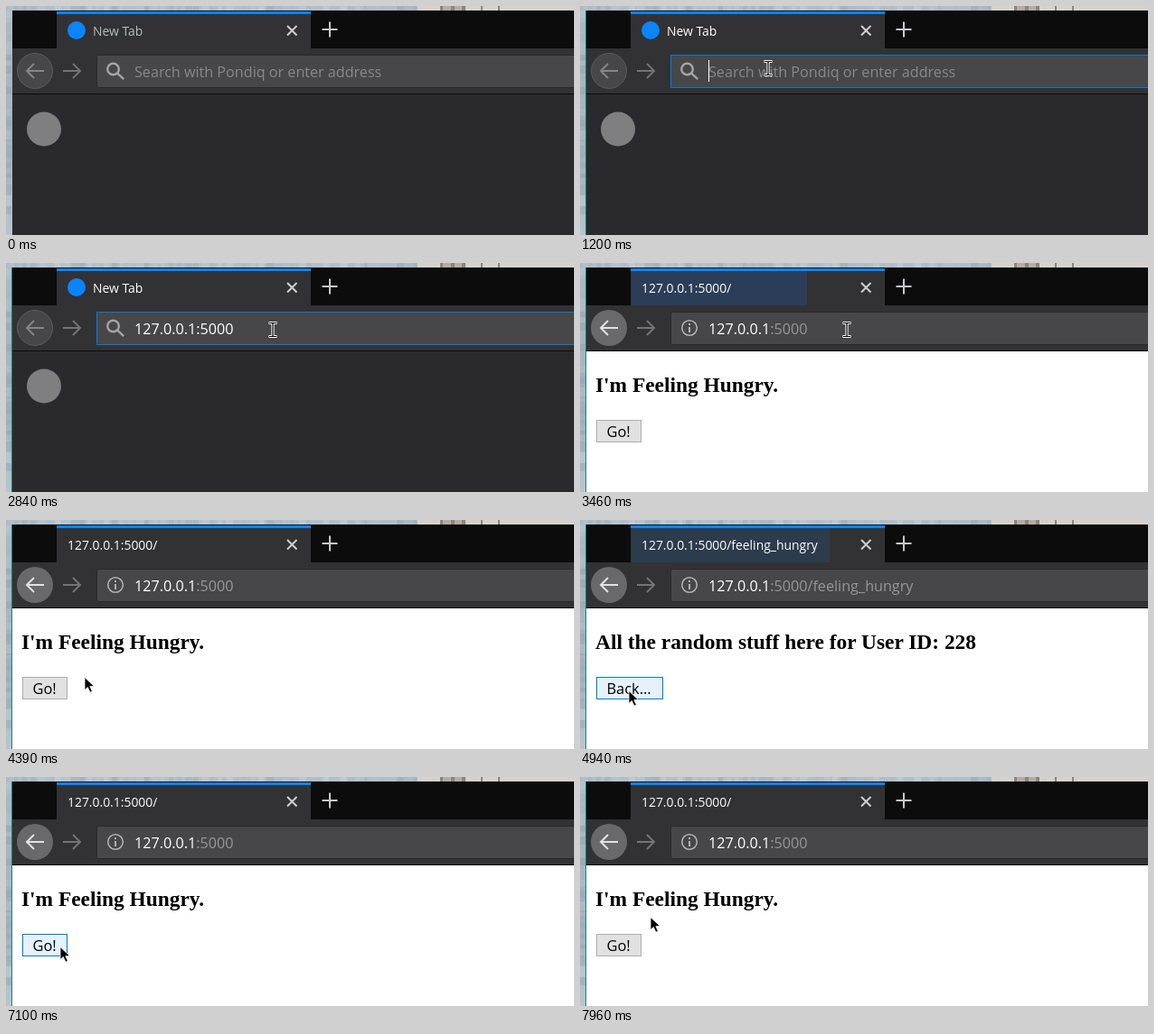
An HTML page for the animation above (8 s loop, 628 by 254 pixels).

```html
<!DOCTYPE html>
<html lang="en">
<head>
<meta charset="utf-8">
<title>Browser demo</title>
<style>
  html, body { margin: 0; width: 100%; height: 100%; overflow: hidden; background: #323234; }
  svg { display: block; width: 628px; height: 254px; }
  text { font-family: "Open Sans", "Noto Sans", sans-serif; font-size: 16.15px; fill: #fff; }
  .tab { font-size: 13.9px; }
  .dim { fill: #97979a; }
  .head { font: bold 23.4px "Liberation Serif", serif; fill: #000; }
  .line { fill: none; stroke: #b1b1b3; stroke-width: 2; }
  .btn text { font-size: 16.4px; fill: #000; }
  .btn rect { fill: #e1e1e1; stroke: #adadad; }
  .btn.hover rect { fill: #e5f1fb; stroke: #0078d7; }
  .btn.press rect { fill: #cce4f7; stroke: #005499; }
</style>
</head>
<body>
<svg viewBox="0 0 628 254">
  <defs>
    <linearGradient id="wall" x2="0" y2="1">
      <stop offset="0" stop-color="#b3c0c9"/>
      <stop offset=".6" stop-color="#9fafbb"/>
      <stop offset="1" stop-color="#b9c5ce"/>
    </linearGradient>
    <linearGradient id="shade" x2="0" y2="1">
      <stop offset="0" stop-opacity=".5"/>
      <stop offset="1" stop-opacity="0"/>
    </linearGradient>
  </defs>

  <!-- desktop -->
  <rect width="628" height="254" fill="url(#wall)"/>
  <g id="grain"></g>
  <rect x="455" width="173" height="6" fill="#d6d2cb"/>
  <path d="M480 0h28v6h-28zM525 0h2v6h-2zM544 0h2v6h-2z" fill="#8c857e"/>
  <path d="M483 0h9v6h-9zM496 0h8v6h-8z" fill="#b5aca3"/>

  <!-- window chrome -->
  <rect x="7" y="5" width="621" height="42" fill="#0c0c0d"/>
  <rect x="56" y="6" width="281" height="41" fill="#323234"/>
  <rect id="tint" x="57" y="9" width="0" height="38"/>
  <rect x="56" y="6" width="281" height="3" fill="#0a84ff"/>
  <rect x="7" y="47" width="621" height="50" fill="#323234"/>
  <rect x="6" y="5" width="1" height="249" fill="#1c7f74" data-on="1200-8000"/>
  <path class="line" d="M311 22l10.500 10.500M321.500 22l-10.500 10.500" style="stroke:#d0d0d3"/>
  <path class="line" d="M349.500 26h17M358 17.500v17" style="stroke:#c8c8ca"/>

  <circle cx="78" cy="27" r="10" fill="#0a84ff" data-on="0-3230"/>
  <text class="tab" x="96" y="32.500" style="fill:#b8bcc2" data-on="0-1200">New Tab</text>
  <text class="tab" x="96" y="32.500" data-on="1200-3230">New Tab</text>
  <text class="tab" x="68" y="32.500" data-on="3230-4710,7030-8000">127.0.0.1:5000/</text>
  <text class="tab" x="68" y="32.500" data-on="4710-7030">127.0.0.1:5000/feeling_hungry</text>

  <g data-on="0-3310">
    <circle cx="32" cy="72" r="19.500" fill="#474749" stroke="#5b5b5d"/>
    <path class="line" d="M42 72H23M31 64l-8 8 8 8" style="stroke:#858587"/>
  </g>
  <g data-on="3310-8000">
    <circle cx="32" cy="72" r="20" fill="#69696b"/>
    <path class="line" d="M42 72H23M31 64l-8 8 8 8" style="stroke:#e2e2e4"/>
  </g>
  <path class="line" d="M63 72h19M74 64l8 8-8 8" style="stroke:#747476"/>

  <!-- address bar -->
  <path d="M640 54.500H102.500q-2 0-2 2v32q0 2 2 2H640z" fill="#474749" stroke="#29292b"/>
  <path d="M640 54.500H100.500v36H640" fill="none" stroke="#0a78d8" stroke-width="1.200" data-on="1200-3230"/>
  <g class="line" data-on="0-3230" style="stroke:#a5a5a7;stroke-width:2.400">
    <circle cx="118.500" cy="70" r="6.300"/>
    <path d="M123.200 74.700l7 6.500"/>
  </g>
  <g data-on="3230-8000">
    <circle class="line" cx="121" cy="72" r="8.300" style="stroke-width:1.600"/>
    <path d="M120 71h2v6h-2zM120 67h2v2h-2z" fill="#b1b1b3"/>
  </g>
  <text x="142" y="78.800" style="fill:#88888a" data-on="0-1980">Search with Pondiq or enter address</text>
  <text x="142" y="78.800" data-on="1980-3230">127.0.0.1:5000</text>
  <text x="142" y="78.800" data-on="3230-4710,7030-8000">127.0.0.1<tspan class="dim">:5000</tspan></text>
  <text x="142" y="78.800" data-on="4710-7030">127.0.0.1<tspan class="dim">:5000/feeling_hungry</tspan></text>
  <rect x="142" y="60" width="1" height="24" fill="#fff" data-on="1200-1750"/>
  <rect x="250" y="60" width="1" height="24" fill="#fff" data-on="1980-2840"/>

  <!-- new tab page -->
  <g data-on="0-3310">
    <rect x="7" y="97" width="621" height="157" fill="#2a2a2e"/>
    <circle cx="42" cy="136.500" r="19" fill="#7f7f81"/>
  </g>

  <!-- suggestions -->
  <g data-on="1980-2670">
    <rect x="7" y="221" width="621" height="4" fill="url(#shade)"/>
    <rect x="8" y="98" width="620" height="48" fill="#4a4a4d"/>
    <rect x="8" y="146" width="620" height="75" fill="#727273"/>
    <path d="M8 146.500h620M8 180.500h620M68.500 187v28" stroke="#858586"/>
    <g class="line" style="stroke-width:1.500">
      <circle cx="122" cy="122" r="9"/>
      <ellipse cx="122" cy="122" rx="4.200" ry="9"/>
      <path d="M113 122h18M114.500 117.500h15M114.500 126.500h15"/>
    </g>
    <text x="143" y="128.500" style="font-size:16.300px">http://<tspan font-weight="600">127.0.0.1:5000</tspan>/</text>
    <path d="M315 124.500h15" stroke="#88888b"/>
    <text x="336" y="129" style="font-size:15px;fill:#347d22">Visit</text>
    <text x="16" y="170" style="font-size:14px;fill:#bcbcbd">Search with:</text>
    <circle cx="39" cy="201" r="10" fill="#fff"/>
    <circle cx="99" cy="201" r="10" fill="#de5833"/>
  </g>

  <!-- site -->
  <g data-on="3310-8000">
    <rect x="7" y="97" width="621" height="157" fill="#fff"/>
    <g data-on="3380-4790,7030-8000">
      <text class="head" x="17" y="143.300">I'm Feeling Hungry.</text>
      <g class="btn" data-press="4640">
        <rect x="18.500" y="174.500" width="49" height="24"/>
        <text x="29.500" y="192.800">Go!</text>
      </g>
    </g>
    <g data-on="4790-7030">
      <text class="head" x="17" y="143.300">All the random stuff here for User ID: 228</text>
      <g class="btn" data-press="6870">
        <rect x="18.500" y="174.500" width="73" height="24"/>
        <text x="29.500" y="192.800">Back...</text>
      </g>
    </g>
  </g>
  <path d="M7 97.500h621" stroke="#0c0c0d"/>

  <!-- pointer -->
  <g id="pointer" data-on="670-8000">
    <path id="arrow" d="M0-.5v14l3.300-3 2.600 5.700 2.500-1.100-2.600-5.500h4.700z" fill="#000" stroke="#fff" stroke-width=".8"/>
    <g id="beam" fill="none">
      <path d="M-4.500-7.500h3.500q1 0 1 1v13q0 1-1 1h-3.500M4.500-7.500H1q-1 0-1 1v13q0 1 1 1h3.500" stroke="#fff" stroke-width="3.200"/>
      <path d="M-4-7.500h3q1 0 1 1v13q0 1-1 1h-3M4-7.500H1q-1 0-1 1v13q0 1 1 1h3" stroke="#000" stroke-width="1.200"/>
    </g>
  </g>
</svg>

<script>
const LOOP = 8000;
const $ = id => document.getElementById(id);

// pointer refresh bursts: start, end, steps
const bursts = [
  [670, 1200, 8], [1980, 2520, 8], [4010, 4480, 7],
  [5350, 6100, 11], [6180, 6720, 8], [7340, 7960, 9]
];

// pointer path: time, x, y
const path = [
  [590, 350, -16], [900, 246, 48], [1200, 208, 69],
  [2058, 208, 69], [2520, 295, 74],
  [3932, 295, 74], [4250, 150, 145], [4480, 54, 190],
  [5275, 54, 190], [5575, 250, 165], [5800, 434, 123], [6100, 423, 141],
  [6103, 423, 141], [6257, 230, 172], [6411, 89, 193], [6566, 70, 198], [6720, 60, 189],
  [7262, 60, 189], [7650, 86, 166], [7960, 78, 156]
];

// tab loading glow: time, width, colour
const glow = [
  [0, 0], [3380, 100, '#2a4263'], [3460, 194, '#2c3e57'], [3540, 0],
  [4790, 100, '#2a4263'], [4860, 194, '#2c3e57'], [4940, 219, '#2d3c4c'], [5110, 0],
  [7110, 194, '#2c3e57'], [7180, 219, '#2d3c4c'], [7340, 0]
];

const timed = [...document.querySelectorAll('[data-on]')].map(el => ({
  el, spans: el.dataset.on.split(',').map(s => s.split('-').map(Number))
}));
const buttons = [...document.querySelectorAll('.btn')].map(el => ({
  el, press: +el.dataset.press, right: 19 + +el.querySelector('rect').getAttribute('width')
}));

function snap(t) {
  let s = 0;
  for (const [a, b, n] of bursts) {
    if (t < a) break;
    const d = (b - a) / (n - 1);
    s = a + Math.min(n - 1, Math.floor((t - a + 12) / d)) * d;
  }
  return s;
}

function pointerAt(t) {
  const i = path.findIndex(p => p[0] > t);
  if (i < 0) return path[path.length - 1].slice(1);
  if (i === 0) return path[0].slice(1);
  const [a, b] = [path[i - 1], path[i]];
  const k = (t - a[0]) / (b[0] - a[0]);
  return [1, 2].map(j => Math.round(a[j] + (b[j] - a[j]) * k));
}

function draw(t) {
  for (const { el, spans } of timed)
    el.style.display = spans.some(([a, b]) => t >= a && t < b) ? '' : 'none';

  const [x, y] = pointerAt(snap(t));
  const overBar = x > 100 && y > 54 && y < 92;
  const overHead = t > 4790 && t < 7030 && x < 440 && y > 120 && y < 150;
  const text = overBar || overHead;
  $('pointer').setAttribute('transform', `translate(${x} ${y})`);
  $('arrow').style.display = text ? 'none' : '';
  $('beam').style.display = text ? '' : 'none';

  for (const { el, press, right } of buttons) {
    const over = x >= 18 && x < right && y >= 174 && y < 199;
    el.classList.toggle('hover', over);
    el.classList.toggle('press', over && t >= press && t < press + 160);
  }

  const [, width, colour] = glow.filter(g => g[0] <= t).pop();
  $('tint').setAttribute('width', width);
  $('tint').setAttribute('fill', colour || 'none');
}

// uneven wallpaper strips along the top and left edges
let seed = 7;
const rand = () => (seed = seed * 16807 % 2147483647) / 2147483647;
let grain = '';
const strip = (x, y, w, h) => {
  const tone = rand() < .5 ? '#fff' : '#5a6b78';
  grain += `<rect x="${x}" y="${y}" width="${w}" height="${h}" fill="${tone}" opacity="${(rand() * .16).toFixed(2)}"/>`;
};
for (let x = 0; x < 455; x += 9) strip(x, 0, 3 + rand() * 6, 5);
for (let y = 6; y < 254; y += 12) strip(0, y, 6, 4 + rand() * 8);
$('grain').innerHTML = grain;

const start = performance.now();
function frame() {
  draw((performance.now() - start) % LOOP);
  requestAnimationFrame(frame);
}
frame();
</script>
</body>
</html>
```
